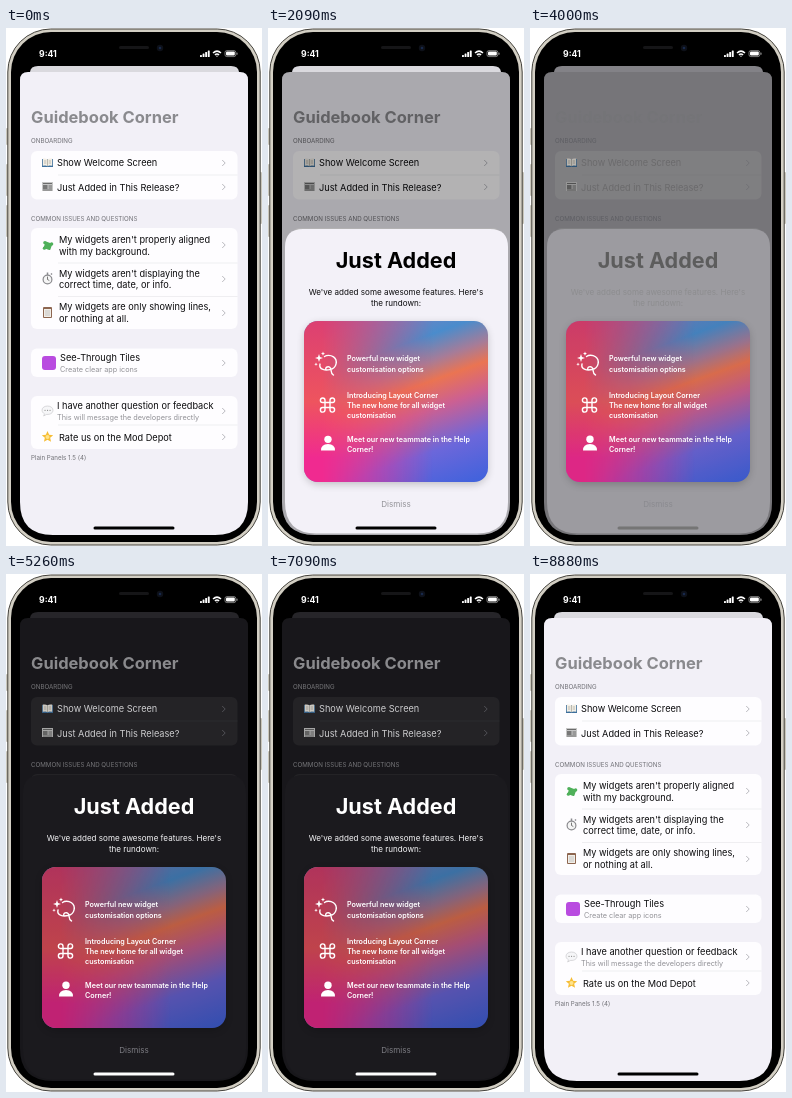
An HTML page that plays this animation: 256 px wide and 518 px high, repeating every 8920 ms.

```html
<!DOCTYPE html>
<html lang="en">
<head>
<meta charset="utf-8">
<title>Widget guide</title>
<style>
  html, body { margin: 0; width: 100%; height: 100%; overflow: hidden; background: #fff; }
  svg { display: block; width: 100vw; height: 100vh; font-family: Inter, "Liberation Sans", sans-serif; }
  .page { fill: var(--page); }
  .peek { fill: var(--peek); }
  .group { fill: var(--group); }
  .sheet { fill: var(--sheet); }
  .row { fill: var(--text); font-size: 9.2px; }
  .muted { fill: var(--muted); }
  .sub { font-size: 7.3px; }
  .caption { fill: var(--caption); font-size: 6.2px; }
  .title { fill: var(--title); font-size: 16.5px; font-weight: 700; }
  .head { fill: var(--head); font-size: 21.6px; font-weight: 700; }
  .body { fill: var(--text); font-size: 8.05px; }
  .feature { fill: #fff; font-size: 7.2px; font-weight: 600; }
  .line { stroke: var(--line); stroke-width: .5; }
  .chevron { fill: none; stroke: var(--chevron); stroke-width: 1; stroke-linecap: round; stroke-linejoin: round; }
  .home { fill: var(--home); }
  .mid { text-anchor: middle; }
  .outline { fill: none; stroke: #fff; stroke-width: 1.4; stroke-linecap: round; stroke-linejoin: round; }
</style>
</head>
<body>
<svg viewBox="0 0 256 518" preserveAspectRatio="none">
  <defs>
    <clipPath id="screen"><path d="M14 36H242V474Q242 507 209 507H47Q14 507 14 474Z"/></clipPath>
    <clipPath id="modalClip"><path d="M17 36H240V474Q240 505.500 208.500 505.500H48.500Q17 505.500 17 474Z"/></clipPath>
    <filter id="shadow" x="-20%" y="-20%" width="140%" height="140%"><feGaussianBlur stdDeviation="4"/></filter>
    <linearGradient id="bands" gradientUnits="userSpaceOnUse" x1="105" y1="291" x2="170" y2="470">
      <stop offset="0" stop-color="#7d7fc0"/>
      <stop offset=".18" stop-color="#4a8ccc"/>
      <stop offset=".31" stop-color="#a67c98"/>
      <stop offset=".41" stop-color="#ea7452"/>
      <stop offset=".55" stop-color="#cc6092"/>
      <stop offset=".76" stop-color="#6c67da"/>
      <stop offset="1" stop-color="#3f62dc"/>
    </linearGradient>
    <linearGradient id="warm" x1="0" y1="0" x2="0" y2="1">
      <stop offset="0" stop-color="#dc4072"/>
      <stop offset=".5" stop-color="#ee545e"/>
      <stop offset=".85" stop-color="#f02a90"/>
    </linearGradient>
    <linearGradient id="fadeRight">
      <stop offset=".1" stop-color="#fff"/>
      <stop offset=".7" stop-color="#000"/>
    </linearGradient>
    <mask id="leftSide"><rect x="36" y="293" width="184" height="161" fill="url(#fadeRight)"/></mask>
  </defs>

  <g fill="#c9c6bb">
    <rect x="0" y="100" width="4" height="17" rx="1"/>
    <rect x="0" y="136" width="4" height="32" rx="1"/>
    <rect x="0" y="177" width="4" height="32" rx="1"/>
    <rect x="252" y="144" width="4" height="52" rx="1"/>
  </g>
  <rect x="1.8" y="1" width="252.4" height="516" rx="43" fill="#d3cfc4" stroke="#45433d" stroke-width="1"/>
  <rect x="5" y="4" width="246" height="510" rx="40" fill="#000"/>
  <rect x="113" y="18" width="30" height="3" rx="1.5" fill="#151517"/>
  <circle cx="154" cy="20" r="3.2" fill="#0d1018"/>
  <circle cx="154" cy="20" r="1.3" fill="#18284a"/>

  <g fill="#fff">
    <text x="33" y="29" font-size="8.7" font-weight="700">9:41</text>
    <g id="signal"></g>
    <path d="M206.5 24.5Q211 20 215.5 24.5L214.4 25.6Q211 22.3 207.6 25.6ZM208.4 26.4Q211 24 213.6 26.4L212.6 27.4Q211 26 209.4 27.4ZM210.1 27.9Q211 27.2 211.9 27.9L211 29Z"/>
    <rect x="219" y="22.6" width="10.8" height="6" rx="1.8" fill="none" stroke="#aaa" stroke-width=".7"/>
    <rect x="220" y="23.6" width="8.8" height="4" rx="1"/>
    <rect x="230.5" y="24.4" width="1" height="2.4" rx=".5" fill="#aaa"/>
  </g>

  <g clip-path="url(#screen)">
    <path class="page" d="M14 510V52Q14 44 22 44H234Q242 44 242 52V510Z"/>
    <text class="title" x="25" y="94.500">Guidebook Corner</text>
    <g id="list"></g>

    <g transform="translate(36 130)">
      <path d="M0 1H11V9H0Z" fill="#3d6f9c"/>
      <path d="M.8 .6Q4 0 5.5 1.4Q7 0 10.2 .6V7.8Q7 7 5.5 8.2Q4 7 .8 7.8Z" fill="#f3efe6"/>
      <path d="M5.5 1.4V8M2 3H4.3M2 5H4.3M6.7 3H9M6.7 5H9" stroke="#99958c" stroke-width=".6"/>
    </g>
    <g transform="translate(36 154)">
      <rect width="11" height="9" fill="#c6c6c6"/>
      <path d="M1 1.5H10M6.5 4H10M6.5 6H10M1 8H10" stroke="#555" stroke-width=".8"/>
      <rect x="1" y="3" width="4.5" height="4" fill="#777"/>
    </g>
    <g transform="translate(36 212)" fill="#4fb05a">
      <rect x="2.4" y="2.4" width="7" height="7" rx="1" transform="rotate(20 6 6)"/>
      <circle cx="3" cy="2.8" r="1.8"/><circle cx="9.6" cy="4" r="1.7"/><circle cx="2.4" cy="8.2" r="1.6"/>
    </g>
    <g>
      <path d="M41.5 244.5V247M45 246.5L46 245.5" stroke="#8a8a8e" stroke-width="1.5"/>
      <circle cx="41.5" cy="251.5" r="4.4" fill="#f5f5f5" stroke="#8a8a8e" stroke-width="1.2"/>
      <path d="M41.5 251.5V248.6M41.5 251.5L43.3 252.5" stroke="#444" stroke-width=".7"/>
    </g>
    <g transform="translate(37 279)">
      <rect width="9" height="11" rx="1" fill="#8d6650"/>
      <rect x="1" y="2" width="7" height="8" fill="#f1eee8"/>
      <path d="M2 4H7M2 6H7M2 8H7" stroke="#aaa" stroke-width=".6"/>
    </g>
    <rect x="36" y="328" width="14" height="14" rx="3" fill="#b94be0"/>
    <path d="M41.5 378C38.3 378 36 379.8 36 382.2C36 383.8 37 385 38.5 385.8L37.6 388L40.6 386.4C44.6 386.7 47 384.8 47 382.2C47 379.8 44.7 378 41.5 378Z" fill="#f6f6f8" stroke="#b6b6ba" stroke-width=".5"/>
    <path d="M39 382.3H39.1M41.5 382.3H41.6M44 382.3H44.1" stroke="#777" stroke-width="1.1" stroke-linecap="round"/>
    <path id="star" fill="#f6bd35"/>
    <circle cx="41.5" cy="409" r="2" fill="#ffe38a"/>

    <rect id="dim" x="14" y="44" width="228" height="466"/>
    <path class="peek" d="M24 44Q24.500 38 32 38H225Q232.500 38 233 44Z"/>

    <g clip-path="url(#modalClip)">
    <g id="modal">
      <path class="sheet" d="M17 850V219Q17 201 35 201H222Q240 201 240 219V850Z"/>
      <text class="head mid" x="128" y="240">Just Added</text>
      <text class="body mid" x="128" y="267">We've added some awesome features. Here's</text>
      <text class="body mid" x="128" y="278">the rundown:</text>
      <rect x="37" y="296" width="182" height="160" rx="14" opacity=".22" filter="url(#shadow)"/>
      <rect x="36" y="293" width="184" height="161" rx="14" fill="url(#bands)"/>
      <rect x="36" y="293" width="184" height="161" rx="14" fill="url(#warm)" mask="url(#leftSide)"/>
      <rect id="shade" x="36" y="293" width="184" height="161" rx="14"/>
      <g class="outline">
        <path d="M52 336C50.5 342 58 342.5 62 341.5C69 340 70 332 65.5 328.8C62.5 326.7 58.5 327 56.5 328.5M58 342C56.5 339 61 337.5 62.5 340C64 342.5 62 345.5 65.5 347"/>
        <path d="M57 372.5V381.5M62 372.5V381.5M55 374.5H64.5M55 379.5H64.5M57 374.5H54.6A2.3 2.3 0 1 1 57 372.2M62 374.5H64.6A2.3 2.3 0 1 0 62 372.2M57 379.5H54.6A2.3 2.3 0 1 0 57 381.8M62 379.5H64.6A2.3 2.3 0 1 1 62 381.8"/>
      </g>
      <path fill="#fff" d="M51 326L52 329L55 330L52 331L51 334L50 331L47 330L50 329ZM55 323.5L55.6 325L57 325.6L55.6 326.2L55 327.7L54.4 326.2L53 325.6L54.4 325ZM48 334.5L48.5 335.7L49.7 336.2L48.5 336.7L48 338L47.5 336.7L46.3 336.2L47.5 335.7Z"/>
      <circle cx="60" cy="411.3" r="3.7" fill="#fff"/>
      <path fill="#fff" d="M53 422.5Q53 416 60 416Q67 416 67 422.5Z"/>
      <g id="features"></g>
      <text class="muted mid" x="128" y="479" font-size="8.1">Dismiss</text>
    </g>
    </g>
    <rect class="home" x="87.500" y="498.500" width="81" height="3" rx="1.5"/>
  </g>
</svg>
<script>
const LOOP = 8920;
const SHEET_TRAVEL = 318;
const $ = id => document.getElementById(id);
const text = (cls, x, y, s) => `<text class="${cls}" x="${x}" y="${y}">${s}</text>`;
const group = (y, h) => `<rect class="group" x="25" y="${y}" width="206.500" height="${h}" rx="6"/>`;
const line = y => `<path class="line" d="M52 ${y}H231.500"/>`;
const chevron = y => `<path class="chevron" d="M216.500 ${y - 2.7}L219.200 ${y}L216.500 ${y + 2.7}"/>`;

$("list").innerHTML = [
  text("caption", 25, 115, "ONBOARDING"),
  group(123, 48.5), line(147),
  text("row", 51, 138, "Show Welcome Screen"),
  text("row", 51, 162.5, "Just Added in This Release?"),
  text("caption", 25, 193, "COMMON ISSUES AND QUESTIONS"),
  group(200, 101), line(235), line(268.5),
  text("row", 53, 215, "My widgets aren't properly aligned"),
  text("row", 53, 226.5, "with my background."),
  text("row", 53, 248.5, "My widgets aren't displaying the"),
  text("row", 53, 260, "correct time, date, or info."),
  text("row", 53, 282, "My widgets are only showing lines,"),
  text("row", 53, 293.5, "or nothing at all."),
  group(320.5, 28.5),
  text("row", 54, 333, "See-Through Tiles"),
  text("muted sub", 54, 344, "Create clear app icons"),
  group(368, 53), line(397),
  text("row", 51, 381, "I have another question or feedback"),
  text("muted sub", 51, 391.5, "This will message the developers directly"),
  text("row", 53, 412.5, "Rate us on the Mod Depot"),
  text("caption sub", 25, 432, "Plain Panels 1.5 (4)"),
  ...[135, 159, 217, 251, 285, 335, 383, 409].map(chevron)
].join("");

$("features").innerHTML = [
  [333, "Powerful new widget"], [343.5, "customisation options"],
  [370, "Introducing Layout Corner"], [380, "The new home for all widget"], [390, "customisation"],
  [413.5, "Meet our new teammate in the Help"], [423.5, "Corner!"]
].map(([y, s]) => text("feature", 79, y, s)).join("");

$("signal").innerHTML = [2, 3.5, 5, 6.5].map((h, i) =>
  `<rect x="${194 + i * 2.6}" y="${29 - h}" width="1.900" height="${h}" rx=".5"/>`).join("");

$("star").setAttribute("d", "M" + Array.from({ length: 10 }, (_, i) => {
  const r = i % 2 ? 2.8 : 6, a = i * Math.PI / 5;
  return `${41.5 + r * Math.sin(a)} ${409 - r * Math.cos(a)}`;
}).join("L") + "Z");

// Each entry: light colour, dark colour, fade exponent.
const theme = {
  page: [[242, 240, 247], [29, 28, 32], 1],
  peek: [[218, 217, 222], [38, 37, 41], .8],
  group: [[254, 253, 255], [43, 42, 46], 1],
  sheet: [[243, 241, 248], [27, 26, 30], 1],
  text: [[12, 12, 14], [245, 245, 247], .65],
  head: [[0, 0, 0], [255, 255, 255], 1.1],
  home: [[0, 0, 0], [255, 255, 255], .85],
  muted: [[146, 146, 151], [126, 126, 132], 1],
  caption: [[112, 112, 118], [142, 142, 147], 1],
  title: [[138, 138, 142], [166, 166, 170], .6],
  line: [[222, 222, 227], [60, 60, 64], 1],
  chevron: [[186, 186, 191], [98, 98, 103], 1]
};

const clamp = v => Math.min(1, Math.max(0, v));
const ramp = (t, start, length) => clamp((t - start) / length);
const mix = (a, b, p) => a + (b - a) * p;
const spring = (t, start) => {
  const x = Math.max(0, t - start) * .011;
  return 1 - (1 + x) * Math.exp(-x);
};

function draw(t) {
  const dark = ramp(t, 3760, 600) - ramp(t, 8240, 450);
  const open = spring(t, 1080) - spring(t, 7533);
  const style = document.documentElement.style;
  for (const [name, [light, night, power]] of Object.entries(theme)) {
    const p = Math.pow(dark, power);
    style.setProperty("--" + name, `rgb(${light.map((c, i) => mix(c, night[i], p))})`);
  }
  $("modal").setAttribute("transform", `translate(0 ${SHEET_TRAVEL * (1 - open)})`);
  $("dim").setAttribute("opacity", open * mix(.3, .17, dark));
  $("shade").setAttribute("opacity", dark * .2);
}

const began = performance.now();
function tick() {
  draw((performance.now() - began) % LOOP);
  requestAnimationFrame(tick);
}
tick();
</script>
</body>
</html>
```
